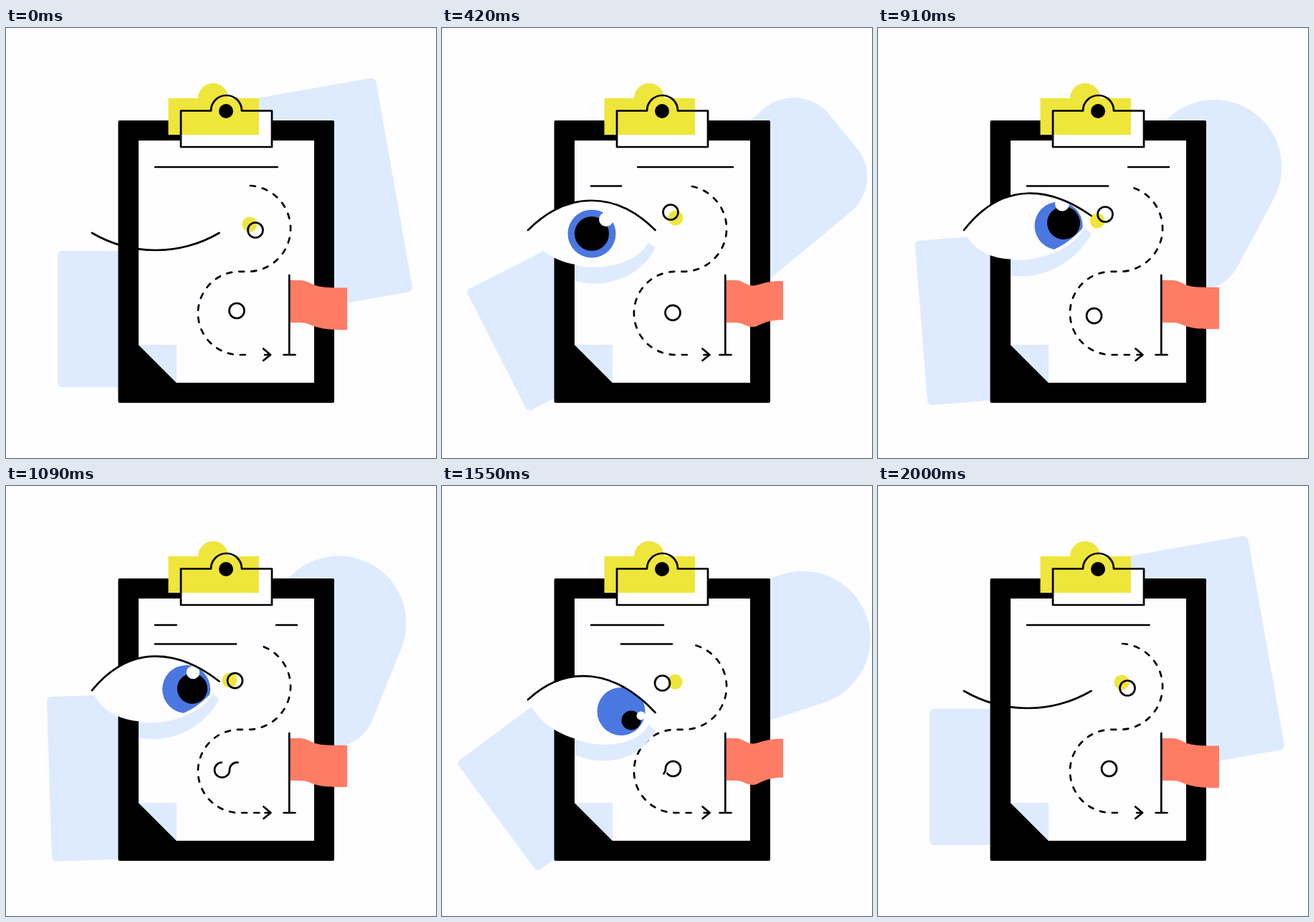
An HTML page for the animation above (2.03 s loop, 600 px wide and 600 px high).

```html
<!DOCTYPE html>
<html lang="en">
<head>
<meta charset="utf-8">
<title>Clipboard plan</title>
<style>
  html, body { margin: 0; width: 100%; height: 100%; overflow: hidden; background: #fefdff; }
  svg { display: block; width: 100%; height: 100%; }
  .ink { fill: none; stroke: #000; stroke-width: 2.7; stroke-linecap: round; stroke-linejoin: round; }
  .pale { fill: #deebfe; }
  .white { fill: #fefdff; }
  .yellow { fill: #eee63b; }
</style>
</head>
<body>
<svg viewBox="0 0 600 600">
  <defs>
    <clipPath id="paperClip"><path d="M185 157H430V495H238L185 442Z"/></clipPath>
    <clipPath id="eyeClip"><path id="eyeMask"/></clipPath>
  </defs>

  <path id="rightCard" class="pale"/>
  <rect id="leftCard" class="pale" width="200" rx="6"/>

  <rect x="156.500" y="129" width="301.500" height="394" rx="2"/>
  <path class="white" d="M185 157H430V495H238L185 442Z"/>
  <path class="pale" d="M185 442H238V495Z"/>

  <path id="lineA" class="ink"/>
  <path id="lineB" class="ink"/>
  <path id="route" class="ink" d="M341 220A60 60 0 0 1 340 339.800H326A58 58 0 0 0 326 456H369"/>
  <path id="arrow" class="ink" d="M-8 456H0M-10 447.500L0 456L-10 464"/>
  <circle id="dot" class="yellow" r="10.500"/>
  <circle id="ring" class="ink" r="10.500"/>
  <path id="loop" class="ink" stroke-dasharray="66 300" d="M312 394.500A10.500 10.500 0 0 0 291 394.500A10.500 10.500 0 0 0 312 394.500A10.500 10.500 0 0 1 333 394.500A10.500 10.500 0 0 1 312 394.500"/>

  <path id="flag" fill="#fe7c64"/>
  <path class="ink" d="M395.300 345V456M387.500 456H403.500"/>

  <g clip-path="url(#paperClip)"><path id="shade" class="pale"/></g>
  <path id="eyeWhite" class="white"/>
  <g clip-path="url(#eyeClip)">
    <circle id="iris" r="33.500" fill="#4a78e0"/>
    <circle id="pupil"/>
    <circle id="glint" class="white"/>
  </g>
  <path id="lid" class="ink"/>

  <path class="white" d="M244 115.500H286A21.500 21.500 0 0 1 329 115.500H371V166H244Z"/>
  <path class="yellow" d="M226.500 98H268A21 21 0 0 1 310 98H353V149H226.500Z"/>
  <path class="ink" d="M244 115.500H286A21.500 21.500 0 0 1 329 115.500H371V166H244Z"/>
  <circle cx="307" cy="116" r="10"/>
</svg>
<script>
const LOOP = 2030, CYCLE = 2000;
const $ = id => document.getElementById(id);
const clamp = (v, low = 0, high = 1) => Math.min(high, Math.max(low, v));
const mix = (a, b, p) => a + (b - a) * p;

function set(id, attrs) {
  for (const name in attrs) $(id).setAttribute(name, attrs[name]);
}

function ramp(t, from, to) {
  const p = clamp((t - from) / (to - from));
  return p * p * (3 - 2 * p);
}

// Eased path through [time, ...values] stops
function curve(t, ...stops) {
  let i = 0;
  while (i < stops.length - 2 && t >= stops[i + 1][0]) i++;
  const [from, ...a] = stops[i], [to, ...b] = stops[i + 1];
  const p = ramp(t, from, to);
  const out = a.map((v, k) => mix(v, b[k], p));
  return out.length > 1 ? out : out[0];
}

// Both cards swing together; "settle" stretches and lifts them mid-loop
function drawCards(t) {
  const turn = curve(t, [150, 0], [580, 39], [700, -3.3], [910, 4.5], [1270, -0.8], [1520, 39], [1720, 0]);
  const settle = ramp(t, 580, 700) - ramp(t, 1270, 1520);
  const round = ramp(t, 0, 700) - ramp(t, 1550, 1740);

  const tilt = -10 + 28 * settle + 2.24 * turn;
  const half = 94, top = mix(7, half, round), base = mix(7, 60, round);
  const bottom = mix(303, 262, round) - half;
  const corner = (r, dx, dy) => `a${r} ${r} 0 0 1 ${dx * r} ${dy * r}`;
  set('rightCard', {
    transform: `translate(${447 + 0.79 * tilt} ${182 + 0.43 * tilt}) rotate(${tilt})`,
    d: `M${top - half} ${-half}H${half - top}${corner(top, 1, 1)}V${bottom - base}${corner(base, -1, 1)}` +
       `H${base - half}${corner(base, -1, -1)}V${top - half}${corner(top, 1, -1)}Z`
  });

  const x = 72 - 11.5 * settle - (1.43 + 0.6 * settle) * turn;
  const y = 311 - 19 * settle + (2.05 - 0.9 * settle) * turn;
  set('leftCard', { transform: `translate(${x} ${y}) rotate(${-turn})`, height: 190 + 40 * settle });
}

// Text lines are written and erased at one constant speed
function drawLines(t) {
  const travel = (begin, max) => clamp(208 + 0.155 * (t - begin), 208, max);
  const stroke = (y, from, to) => to - from > 2 ? `M${from} ${y}H${to}` : '';
  set('lineA', { d: stroke(194, travel(0, 405), travel(900 - CYCLE, 406)) + stroke(194, 208, travel(900, 406)) });
  set('lineB', { d: stroke(220.5, travel(1280, 321), travel(150, 321)) });
}

function drawRoute(t) {
  const shift = curve(t, [0, 0], [420, 8], [700, 3], [980, 19.5], [1300, 19.5], [2000, 0]);
  set('route', {
    'stroke-dasharray': '7 10.2 '.repeat(22) + '7 900',
    'stroke-dashoffset': -shift
  });
  const sway = Math.cos(t / 1000 * 2 * Math.PI);
  set('arrow', { transform: `translate(${371.4 - 2.3 * sway} 0)` });
  drawFlag(357.5 + 5 * sway);
}

function drawFlag(end) {
  const low = 407 + 1.5 * (end - 353);
  const slope = (end - 352) * 0.25;
  const mid = 359.5, lowMid = 417;
  set('flag', {
    d: `M396 352H410C420 352 424 ${mid - slope} 433 ${mid}C443 ${mid + slope} 448 ${end} 476 ${end}` +
       `V${low}C448 ${low} 443 ${lowMid + slope} 433 ${lowMid}C424 ${lowMid - slope} 420 411 410 411H396Z`
  });
}

function drawMarkers(t) {
  const [rx, ry] = curve(t, [0, 348, 282], [420, 319, 257], [910, 317, 260],
    [1270, 322, 283], [1550, 307.5, 275], [2000, 348, 282]);
  const [dx, dy] = curve(t, [0, 340, 274], [420, 326, 265], [700, 319, 250],
    [910, 306, 269], [1270, 318, 273], [2000, 340, 274]);
  set('ring', { cx: rx, cy: ry });
  set('dot', { cx: dx, cy: dy });

  // The lower ring slides aside, then unrolls back along an S
  const unroll = clamp((t - 900) / 740);
  const slide = unroll > 0 ? 0 : 20.5 * (1 - ramp(t, 570, 950));
  const sag = 9 * Math.sin(Math.PI * clamp((t - 340) / 800));
  set('loop', { transform: `translate(${slide} ${sag})`, 'stroke-dashoffset': -66 * unroll });
}

const REST = { left: 282, right: 282, skew: 0, iris: [209, 287], pupil: [209, 287, 24], glint: [229, 267, 10] };
const UP = { left: 282, right: 262, skew: -16, iris: [252, 276], pupil: [259, 272, 23], glint: [257, 245.5, 10] };
const DOWN = { left: 298, right: 316, skew: 4, iris: [250, 314.5], pupil: [264, 327, 13.5], glint: [277.5, 320.5, 6] };

function blend(a, b, p) {
  const out = {};
  for (const key in a) {
    out[key] = Array.isArray(a[key]) ? a[key].map((v, i) => mix(v, b[key][i], p)) : mix(a[key], b[key], p);
  }
  return out;
}

function gaze(t) {
  if (t < 910) return blend(REST, UP, ramp(t, 600, 910));
  if (t < 1600) return blend(UP, DOWN, ramp(t, 910, 1550));
  return blend(DOWN, REST, ramp(t, 1650, 1950));
}

function drawEye(t) {
  const open = curve(t, [40, 0], [370, 1], [540, 1], [690, 0.22], [880, 1], [1640, 1], [1950, 0]);
  const shut = 1 - open;
  const look = gaze(t);
  const x1 = 120, x2 = 297.5;
  const y1 = look.left + 4 * shut, y2 = look.right + 4 * shut;

  const bend = mix(32, -55, open), sag = mix(32, 66, open);
  const in1 = mix(55, 26, open), in2 = mix(55, 36, open);
  const lid = `M${x1} ${y1}C${x1 + 55} ${y1 + bend + look.skew} ${x2 - 55} ${y2 + bend - look.skew} ${x2} ${y2}`;
  const back = `C${x2 - in2} ${y2 + sag} ${x1 + in1} ${y1 + sag} ${x1} ${y1}Z`;
  set('lid', { d: lid });
  set('eyeWhite', { d: lid + back });
  set('eyeMask', { d: lid + back });

  const depth = Math.min(1, 4 * open), drop = 25 * depth, belly = sag + 29 * depth;
  set('shade', {
    d: `M${x1} ${y1}C${x1 + in1} ${y1 + belly} ${x2 - in2} ${y2 + belly} ${x2} ${y2 + drop}` +
       `l${-9 * depth} ${-8 * depth}${back}`
  });

  for (const id of ['iris', 'pupil', 'glint']) {
    const [cx, cy, r = 33.5] = look[id];
    set(id, { cx, cy: cy + 8 * shut, r });
  }
}

function draw(now) {
  const t = Math.min(now % LOOP, CYCLE);
  drawCards(t);
  drawLines(t);
  drawRoute(t);
  drawMarkers(t);
  drawEye(t);
}

const start = performance.now();
function tick() {
  draw(performance.now() - start);
  requestAnimationFrame(tick);
}
tick();
</script>
</body>
</html>
```
